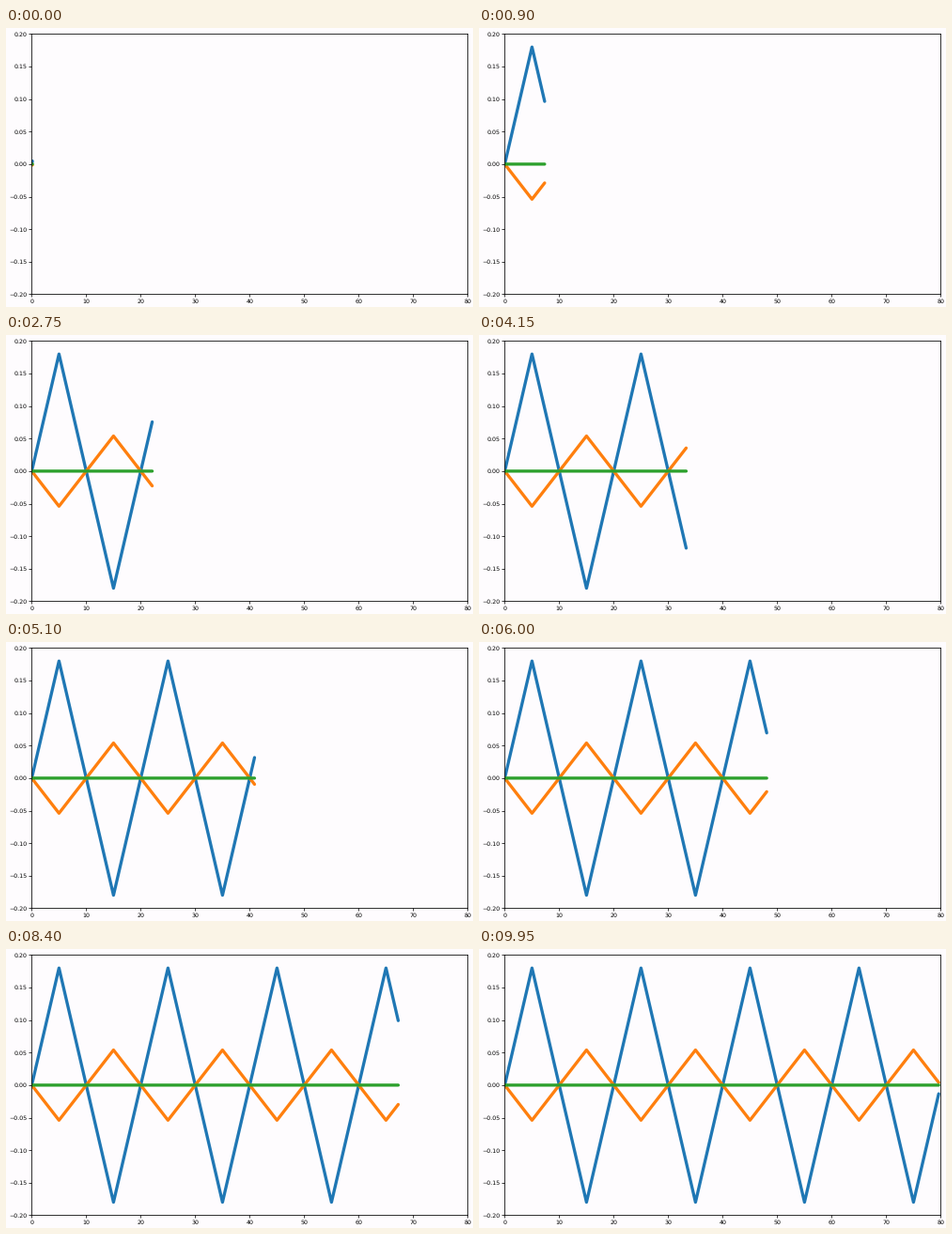
Recreate the animation shown at these times as a matplotlib script. Size 497x297 px, loop 10 s.

```python
import numpy as np
import matplotlib.pyplot as plt
from matplotlib.animation import FuncAnimation

W, H, DPI = 497, 297, 64
PX = 72 / DPI            # one pixel in points
FRAMES, INTERVAL = 200, 50
START, END = 0.13, 79.63  # head of the curves in the first and last frame
STEP = 0.1
BACK = "#fefcfe"


def triangle(x, peak):
    """Triangle wave with period 20, rising first to peak at x = 5."""
    return peak * 2 / np.pi * np.arcsin(np.sin(np.pi * x / 10))


plt.rcParams["font.family"] = "DejaVu Sans"
plt.rcParams["text.hinting"] = "no_hinting"
fig = plt.figure(figsize=(W / DPI, H / DPI), dpi=DPI, facecolor=BACK)
left, right, top, bottom = 27.4, 491.4, 6.4, 283.4
ax = fig.add_axes([left / W, 1 - bottom / H,
                   (right - left) / W, (bottom - top) / H], facecolor=BACK)
ax.set_xlim(0, 80)
ax.set_ylim(-0.2, 0.2)
ax.tick_params(labelsize=6.3 * PX, length=2.6 * PX, width=0.75 * PX,
               pad=2.6 * PX)
for spine in ax.spines.values():
    spine.set_linewidth(0.8 * PX)

curves = []
for color, peak in (("C0", 0.18), ("C1", -0.054), ("C2", 0)):
    line, = ax.plot([], [], color=color, linewidth=3.3 * PX, snap=False,
                    solid_capstyle="round", solid_joinstyle="round")
    curves.append((line, peak))


def draw(i):
    head = START + (END - START) * i / (FRAMES - 1)
    x = np.append(np.arange(0, head, STEP), head)
    for line, peak in curves:
        line.set_data(x, triangle(x, peak))
    return [line for line, _ in curves]


anim = FuncAnimation(fig, draw, frames=FRAMES, interval=INTERVAL,
                     repeat=True, repeat_delay=0)
plt.show()
```
